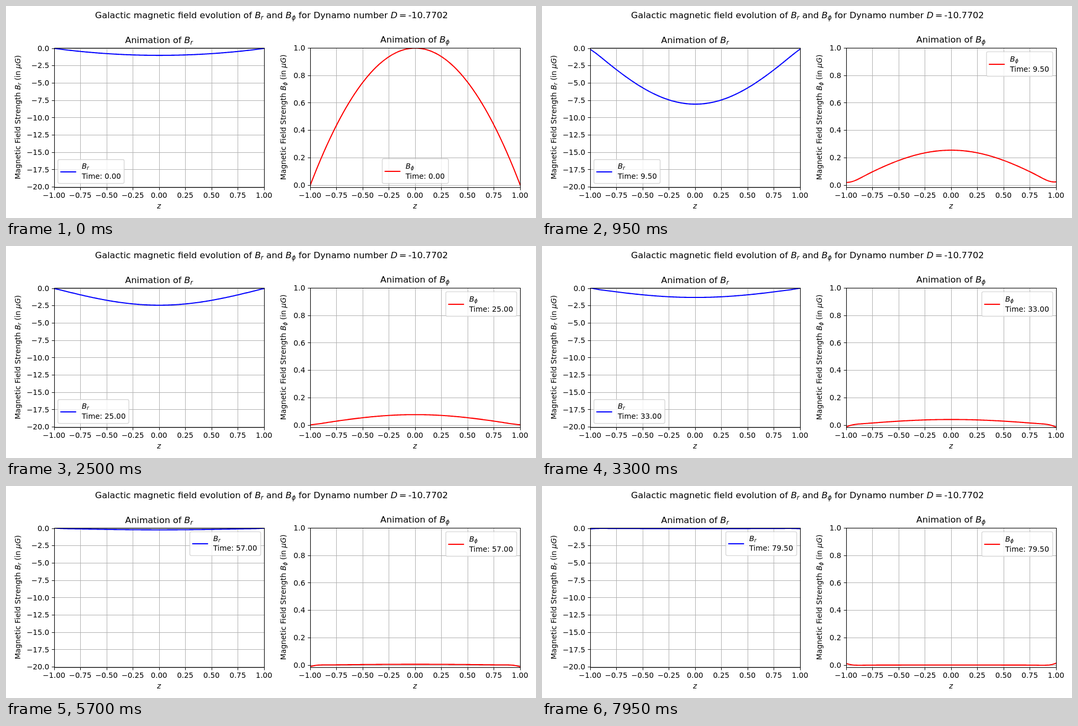
An HTML page with a canvas for the animation above (8000 ms loop, 1000 by 400 pixels).

```html
<!DOCTYPE html>
<html lang="en">
<head>
<meta charset="utf-8">
<style>
  html, body { margin: 0; width: 100%; height: 100%; overflow: hidden; background: #fff; }
  canvas { display: block; }
</style>
</head>
<body>
<canvas id="stage" width="1000" height="400"></canvas>
<script>
const ctx = document.getElementById('stage').getContext('2d');
const LOOP = 8000, STEP = 50;
const SMALL = 13.89, LARGE = 16.67;
const TOP = 79.5, BOTTOM = 342.5, WIDTH = 396;
const snap = v => Math.floor(v) + 0.5;

// Rich text: "*x" is italic, "_x" an italic subscript; parts are split by "|".
function parts(text, size) {
  return text.split('|').map(raw => {
    const sub = raw[0] === '_', italic = sub || raw[0] === '*';
    const font = `${italic ? 'italic ' : ''}${sub ? size * 0.7 : size}px "DejaVu Sans", sans-serif`;
    const str = italic ? raw.slice(1) : raw;
    ctx.font = font;
    return { str, font, drop: sub ? size * 0.17 : 0, width: ctx.measureText(str).width };
  });
}

function write(text, x, y, size = SMALL, align = 0) {
  const list = parts(text, size);
  x -= align * list.reduce((sum, p) => sum + p.width, 0);
  ctx.fillStyle = '#000';
  for (const p of list) {
    ctx.font = p.font;
    ctx.fillText(p.str, x, y + p.drop);
    x += p.width;
  }
}

function line(x1, y1, x2, y2, color, width = 1) {
  ctx.strokeStyle = color;
  ctx.lineWidth = width;
  ctx.beginPath();
  ctx.moveTo(x1, y1);
  ctx.lineTo(x2, y2);
  ctx.stroke();
}

// Decaying cosine modes of the coupled field, starting from a parabola.
const RATIO = 31.5, COUPLING = 2.39;

function modes(t) {
  const list = [];
  for (let n = 1; n < 40; n += 2) {
    const k = n * Math.PI / 2;
    const c = (n % 4 === 1 ? 2 : -2) / k ** 3;
    const slow = c * (1 + 1 / RATIO) * Math.exp((COUPLING - k * k) * t);
    const fast = c * (1 - 1 / RATIO) * Math.exp((-COUPLING - k * k) * t);
    list.push({ k, phi: slow + fast, r: RATIO * (fast - slow) });
  }
  return list;
}

// Slow drift of the boundary value over time.
const DRIFT = [[0, 0], [2, 0.02], [9.5, 0.022], [17.5, 0.018], [33, -0.0135],
  [45, -0.013], [57, -0.011], [79.5, 0.0135]];

function drift(t) {
  const i = Math.max(1, DRIFT.findIndex(p => p[0] >= t));
  const [t0, a] = DRIFT[i - 1], [t1, b] = DRIFT[i];
  return a + (b - a) * (t - t0) / (t1 - t0);
}

function field(t, key) {
  const list = modes(t), edge = drift(t) * (key === 'r' ? -5 : 1);
  const skew = key === 'r' ? -0.25 : 0.1;
  return z => {
    const s = (1 - Math.abs(z)) / 0.055;
    const layer = edge * (1 + skew * z) * Math.exp(-s) * Math.cos(s);
    return list.reduce((sum, m) => sum + m[key] * Math.cos(m.k * z), layer);
  };
}

const PLOTS = [
  { key: 'r', sub: '_r', left: 91.5, zero: 80.02, scale: 13.08, color: '#00f',
    first: -20, gap: 2.5, count: 9, labelX: 27, titleY: 70,
    legend: { height: 45, name: 17.5, time: 36, mark: 23 },
    place: peak => peak < -0.5 ? 'lower left' : 'upper right' },
  { key: 'phi', sub: '_\u03d5', left: 574.5, zero: 338.05, scale: 258.6, color: '#f00',
    first: 0, gap: 0.2, count: 6, labelX: 528, titleY: 69,
    legend: { height: 46.5, name: 18.5, time: 37.5, mark: 23.7 },
    place: peak => peak > 0.9 ? 'lower center' : 'upper right' }
];

const label = (v, digits) => v.toFixed(digits).replace('-', '\u2212');

function legend(p, t, place) {
  const { height, name, time, mark } = p.legend;
  const text = 'Time: ' + t.toFixed(2);
  const width = 51 + parts(text, SMALL)[0].width;
  const x = place === 'lower left' ? p.left + 6.5
    : place === 'lower center' ? p.left + (WIDTH - width) / 2 - 0.2
    : p.left + WIDTH - 6.9 - width;
  const y = place === 'upper right' ? TOP + 6.9 : BOTTOM - 7.7 - height;
  ctx.beginPath();
  ctx.roundRect(x, y, width, height, 2.8);
  ctx.fillStyle = 'rgba(255,255,255,.8)';
  ctx.fill();
  ctx.strokeStyle = 'rgba(204,204,204,.8)';
  ctx.lineWidth = 1.39;
  ctx.stroke();
  const my = Math.round(y + mark);
  line(x + 4.5, my, x + 34.4, my, p.color, 2.08);
  const tx = Math.round(x + 44.6);
  write('*B|' + p.sub, tx, Math.round(y + name));
  write(text, tx, Math.round(y + time));
}

function plot(p, t) {
  const right = p.left + WIDTH;
  const xs = Array.from({ length: 9 }, (_, i) => -1 + i / 4);
  const ys = Array.from({ length: p.count }, (_, i) => p.first + i * p.gap);
  const px = z => p.left - 0.4 + (z + 1) * 198.1;
  const py = v => p.zero - v * p.scale;

  for (const z of xs) line(snap(px(z)), TOP, snap(px(z)), BOTTOM, '#b0b0b0');
  for (const v of ys) line(p.left, snap(py(v)), right, snap(py(v)), '#b0b0b0');

  const f = field(t, p.key);
  ctx.save();
  ctx.beginPath();
  ctx.rect(p.left, TOP, WIDTH, BOTTOM - TOP);
  ctx.clip();
  ctx.beginPath();
  for (let i = -100; i <= 100; i++) ctx.lineTo(px(i / 100), py(f(i / 100)));
  ctx.strokeStyle = p.color;
  ctx.lineWidth = 2.08;
  ctx.lineJoin = 'round';
  ctx.stroke();
  ctx.restore();

  ctx.strokeStyle = '#000';
  ctx.lineWidth = 1.11;
  ctx.strokeRect(p.left, TOP, WIDTH, BOTTOM - TOP);
  for (const z of xs) {
    line(snap(px(z)), BOTTOM, snap(px(z)), BOTTOM + 5, '#000');
    write(label(z, 2), px(z) - 0.5, 362, SMALL, 0.5);
  }
  for (const v of ys) {
    line(p.left - 5, snap(py(v)), p.left, snap(py(v)), '#000');
    write(label(v, 1), p.left - 10, Math.round(py(v) + 4.7), SMALL, 1);
  }

  write('Animation of |*B|' + p.sub, px(0) - 0.5, p.titleY, LARGE, 0.5);
  write('*z', px(0) - 0.5, 382, SMALL, 0.5);
  ctx.save();
  ctx.translate(p.labelX, 210);
  ctx.rotate(-Math.PI / 2);
  write(`Magnetic Field Strength |*B|${p.sub}| (in |*\u03bcG|)`, 0, 0, SMALL, 0.5);
  ctx.restore();

  legend(p, t, p.place(f(0)));
}

function draw(now) {
  const t = Math.floor(now % LOOP / STEP) * 0.5;
  ctx.fillStyle = '#fff';
  ctx.fillRect(0, 0, 1000, 400);
  write('Galactic magnetic field evolution of |*B|_r| and |*B|_\u03d5| for Dynamo number |*D|\u2009=\u2009-10.7702',
    501, 23, LARGE, 0.5);
  for (const p of PLOTS) plot(p, t);
}

const start = performance.now();
function tick() {
  draw(performance.now() - start);
  requestAnimationFrame(tick);
}
tick();
</script>
</body>
</html>
```
